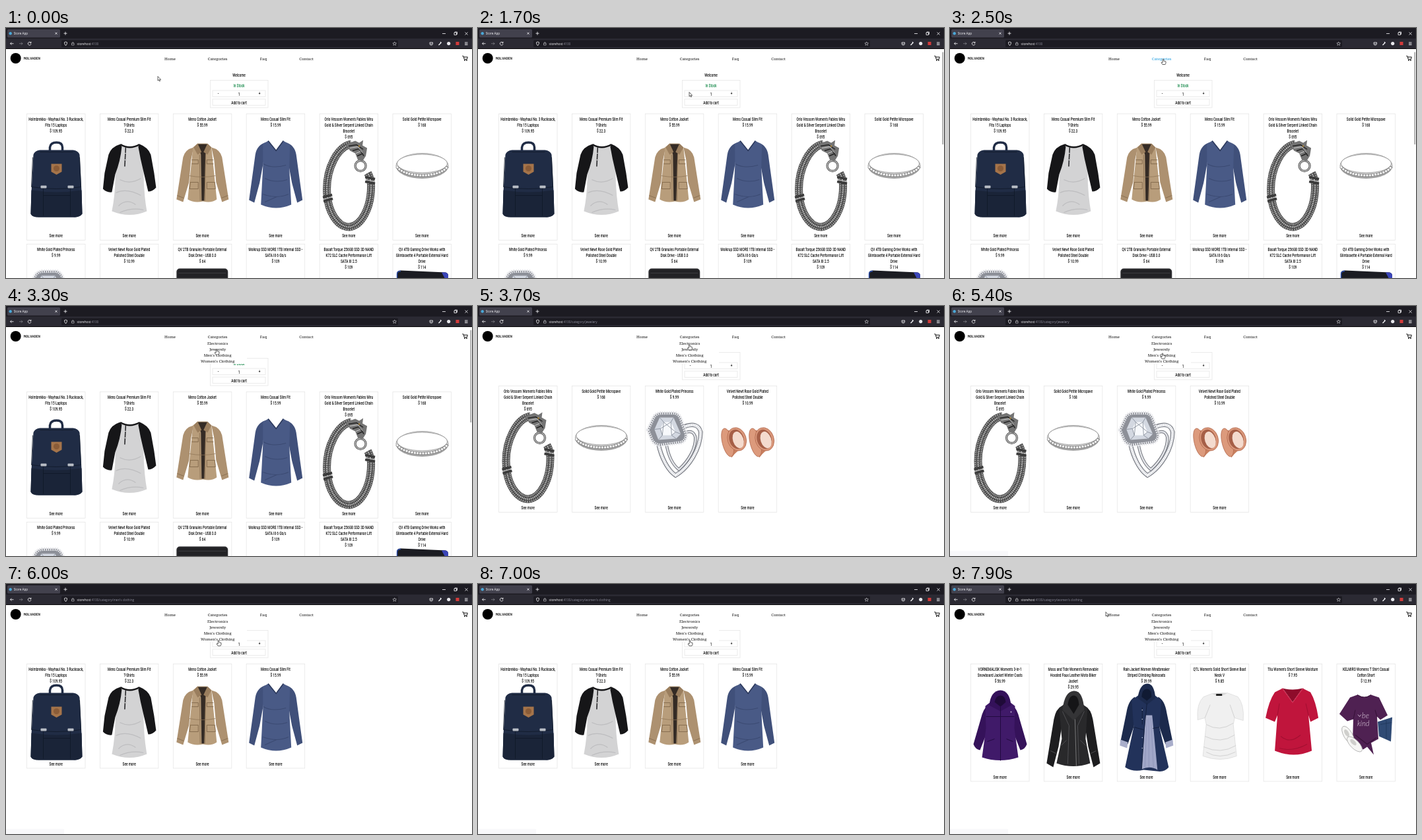
Animation, 706 px wide and 380 px high, one loop 8 s. Source, as an HTML page:

```html
<!DOCTYPE html>
<html>
<head>
<meta charset="utf-8">
<title>Shop</title>
<style>
  html, body { margin: 0; width: 100%; height: 100%; overflow: hidden; background: #fff; }
  svg { display: block; width: 706px; height: 380px; }
  .ui { font: 4.7px "Open Sans", "Noto Sans", sans-serif; fill: #fbfbfe; }
  .slab { font: 500 6px "Noto Serif", serif; text-anchor: middle; fill: #111; }
  .narrow { font: 500 7.2px Roboto, "Liberation Sans", sans-serif; text-anchor: middle; fill: #111; }
  .brand { font: 700 5.2px "DejaVu Sans Mono", monospace; fill: #222; }
  .box { fill: #fff; stroke: #e6e6e6; stroke-width: .8; }
  .icon { fill: none; stroke: #fbfbfe; stroke-width: .8; }
</style>
</head>
<body>
<svg id="stage" viewBox="0 0 706 380"></svg>
<script>
const fill = (d, color, extra = '') => `<path d="${d}" fill="${color}" ${extra}/>`;
const line = (d, color, width = .7, extra = '') =>
  `<path d="${d}" fill="none" stroke="${color}" stroke-width="${width}" ${extra}/>`;
const rect = (x, y, w, h, color, rx = 0) =>
  `<rect x="${x}" y="${y}" width="${w}" height="${h}" rx="${rx}" fill="${color}"/>`;
const dot = (x, y, r, color) => `<circle cx="${x}" cy="${y}" r="${r}" fill="${color}"/>`;
const oval = (x, y, rx, ry, color, turn = 0, extra = '') =>
  `<ellipse rx="${rx}" ry="${ry}" fill="${color}" transform="translate(${x} ${y}) rotate(${turn})" ${extra}/>`;
const box = (x, y, w, h) => `<rect class="box" x="${x}" y="${y}" width="${w}" height="${h}"/>`;
const move = (x, y, s) => `<g transform="translate(${x} ${y})">${s}</g>`;
const both = s => s + `<g transform="translate(89 0) scale(-1 1)">${s}</g>`;
const slab = (x, y, s, id = '') => `<text class="slab" id="${id}" x="${x}" y="${y}">${s}</text>`;
// Condensed face: one fixed narrowing for all shop text
const narrow = (x, y, s, color = '#111') =>
  `<text class="narrow" style="fill:${color}" transform="translate(${x} ${y}) scale(.66 1)">${s}</text>`;

// Product pictures, relative to the top left corner of a card
const art = {
  backpack: () =>
    line('M35 60V51Q36 43.500 45 43.500T54 51V60', '#202c45', 3.5) +
    fill('M10 62Q12 56 20 55H70Q78 56 80 62L83 118L84 152Q80 158 70 157H18Q8 157 6 152L7 118Z', '#202c45') +
    fill('M7 116Q45 122 83 116L84 152Q80 157 70 157H18Q8 157 6 152Z', '#1a2438') +
    line('M9 66L7 111Q45 117 82 111L80 66M25 112V155M66 112V155M25 124H66M20 58H70', '#101828', .8) +
    fill('M37 76H53V88L45 92.500L37 88Z', '#a5744a') + dot(45, 83, 4.5, '#8a5c38') +
    rect(21, 109, 9, 4, '#b9bec6', 1) + rect(62, 109, 9, 4, '#b9bec6', 1),

  raglan: () =>
    fill('M30 47Q45 54 61 47L66 85Q66 120 71 148Q45 159 18 148Q24 118 23 88Z', '#d3d3d4') +
    line('M28 140Q40 128 54 138M24 120Q40 112 62 124M30 150Q48 142 66 146M30 100Q46 108 62 98', '#bdbdbf', 1.2) +
    fill('M31 46Q17 50 13 62L7 90L4.500 114Q10 120 18 119L23 92Q31 72 33 50Z', '#161618') +
    fill('M60 46Q73 51 77 62L82 90L85 112Q80 118 73 118L66 88Q61 68 58 50Z', '#161618') +
    line('M31 46.500Q45 55 60 46.500', '#161618', 2.5) + line('M39 50L37.500 80', '#29292b', 1.6) +
    dot(38.5, 60, .8, '#fff') + dot(38, 70, .8, '#fff'),

  jacket: () =>
    both(fill('M31 51Q18 54 15 66L5 130L15 134L24 104L27 70Z', '#ad9170')) +
    fill('M30 51L37 45H51L58 51L66 130Q58 136 45 133Q32 136 22 130Z', '#b89d7b') +
    fill('M37 46H52L49 62L47 132H43L42 62Z', '#342b25') +
    both(fill('M31 51L37 45L43 58L37 62Z', '#9a7e5e') + line('M26 104H38V114H25ZM28 70H38V76H28', '#7b6246', .8) +
      line('M6 124L16 128M40 62L41 132', '#7b6246', .7)) + line('M24 94Q45 98 64 94', '#8c7253'),

  vneck: () =>
    both(fill('M30 43Q16 47 13.500 62L9 95L4 131L12 135L20 105L25 78Z', '#40507a')) +
    fill('M33 41L45 56L56 41L66 47L65 82L68 138Q45 148 22 138L25 82L25 46Z', '#495a86') +
    line('M33 41L45 56L56 41', '#2c395c', 1.6) +
    line('M26 76Q38 84 60 78M28 98Q44 106 62 100M25 122Q46 130 64 122M28 134L46 126', '#3b4a72', 1.1),

  bracelet: () => {
    const chain = 'M48 46C26 50 11 84 11 114C11 150 28 172 45 172C64 170 78 142 78 110Q78 99 73 90';
    return line(chain, '#4c4c4c', 12) +
      line(chain, '#b4b4b4', 10.5, 'stroke-dasharray="1.300 1.500"') +
      line(chain, '#3a3a3a', 6, 'stroke-dasharray="1.200 1.600"') +
      line(chain, '#cfcfcf', 2, 'stroke-dasharray="1.500 1.300"') +
      line('M5 127L19 123M6 133L20 129M69 96L84 99M69 103L84 106', '#3b3b3b', 3.5) +
      line('M5 130L20 126M69 100L84 103', '#c9c9c9', 1.2) +
      `<circle cx="62" cy="79" r="8" fill="none" stroke="#666" stroke-width="3.400"/>
       <circle cx="62" cy="79" r="8" fill="none" stroke="#ddd" stroke-width="1"/>` +
      fill('M40 46L54 41L60 44L66 40L65 48L72 52L70 64L65 72L58 70L54 60L46 56Z', '#747474') +
      line('M44 49L56 47L66 54M50 56L60 53L67 64M57 64L64 61', '#222', 1.4) +
      line('M46 52L58 50L65 59M55 60L62 57', '#ddd', .9) + dot(60, 49, 1.2, '#b08a3e');
  },

  band: () =>
    oval(44.5, 79, 40, 19.5, '#a2a2a2') + oval(44.5, 78, 39, 17.5, '#dedede') +
    oval(44.5, 75.5, 38, 14, '#fff', 0, 'stroke="#8e8e8e" stroke-width=".8"') +
    line('M6 80C18 98 71 98 83 80', '#777', 4.4) +
    line('M6 80C18 98 71 98 83 80', '#f4f4f4', 3, 'stroke-dasharray="3.200 1"'),

  princess: () => {
    const halo = 'M4 67L13 47Q16 42 24 41L44 41Q51 42 54 50L62 73Q63 82 55 86L24 90Q14 90 10 82Z';
    const bands = [
      ['M20 88C24 108 34 128 46 136C66 124 84 96 84 70Q80 54 59 62', 6.5],
      ['M32 88C35 106 42 120 51 127C66 114 77 94 76 78Q73 66 61 71', 4.5]
    ];
    return bands.map(([d, w]) => line(d, '#6f727a', w) + line(d, '#d9dbe0', w - 2) +
      line(d, '#fff', w - 3.5, 'stroke-dasharray="1.300 1.300"')).join('') +
      fill(halo, '#8d9098') + line(halo, '#5d6068', 1) +
      line(halo, '#e4e5e9', 5, 'stroke-dasharray="2 1.300"') +
      fill('M14 66L22 48H43L54 73L47 80L20 82Z', '#d3d8e1') +
      fill('M23 65L28 55H39L46 70L40 75H26Z', '#f7f9fc') +
      line('M14 66L23 65L26 75L20 82M22 48L28 55L26 75M43 48L39 55L40 75M54 73L46 70L40 75L47 80M23 65L39 55M28 55L46 70', '#7f8793', .8);
  },

  tunnels: () => {
    const ring = fill('M10 65Q20 72 30 64L42 90Q28 98 20 109Z', '#c9805f') +
      oval(14, 86, 8, 22, '#dc9a7c', -14, 'stroke="#b56b50" stroke-width=".8"') +
      oval(28, 81, 14, 18, '#d9977a', -18, 'stroke="#b56b50" stroke-width=".8"') +
      oval(27.5, 81, 11, 15, '#a65f47', -18) + oval(30, 82, 8, 13, '#f4dbce', -18);
    return ring + move(42, 0, ring);
  },

  drive: () => rect(5, 37, 78, 120, '#303033', 5) + rect(6.5, 38.5, 75, 118, '#222225', 4) +
    line('M8 44H80', '#434347', .8),
  gameDrive: () => move(0, 2, fill('M6 42Q7 38 12 38L80 41Q84 42 84 46V150H6Z', '#1b1c22') +
    line('M6.500 150V43Q7 39 12 39', '#2d4fae', 1.4) + fill('M74 41L80 41Q84 42 84 46V60Z', '#3a45b8')),

  ski: () =>
    both(fill('M27 62Q19 67 15 84L4 122Q7 130 14 131L23 108L27 84Z', '#35125a')) +
    fill('M31 57L22 64L23 98L17 142Q44 151 72 142L66 98L67 64L58 57Z', '#401a69') +
    fill('M28 63Q30 41 45 40Q59 41 61 63L45 72Z', '#34115a') + fill('M36 58Q38 48 45 48T53 58L45 65Z', '#1f0a38') +
    line('M45 65V147M23 80H66M25 118L36 114M64 118L54 114', '#220a40', 1) + dot(61, 73, 1, '#c9bdda'),

  leather: () =>
    both(fill('M27 64Q18 68 15 84L4 151L14 157L22 126L27 94Z', '#1d1d1f')) +
    fill('M32 60L23 67L27 114L19 151Q44 160 70 151L63 114L66 67L57 60Z', '#29292b') +
    fill('M28 70Q31 42 45 41T61 70L45 86Z', '#343436') + fill('M36 62Q38 48 45 48T53 62L45 76Z', '#151517') +
    both(line('M28 72L38 94L36 152M26 124L34 116M10 132L18 136', '#59595c', .8)) + line('M47 84L49 155', '#8d8d8d', .8),

  rain: () =>
    both(fill('M27 50Q17 55 14 74L5 118L16 122L25 96L28 70Z', '#1c2a4c') + fill('M5 115L16 119L15 128L4 124Z', '#a9aecb')) +
    fill('M33 47L22 55L25 96L12 157Q24 165 40 161L60 163Q72 165 78 157L64 96L67 55L56 47Z', '#22325a') +
    fill('M43 78L37 160Q50 154 61 161L53 78Z', '#a1a7c8') +
    line('M45 84L42 157M48 82L48 157M51 82L55 158', '#838ab0', .6) +
    fill('M31 52Q34 31 45 30T58 52L45 62Z', '#1c2a4c') + fill('M37 50Q38 38 45 38T52 50L45 56Z', '#101a33') +
    line('M45 60L41 100L37 160M25 96L40 100M54 98L64 96M38 66V92', '#111c38', .9) +
    [70, 84, 112, 128].map(y => dot(38, y, .8, '#c3c8da')).join(''),

  boat: () =>
    fill('M33 45Q45 52 56 44L72 50Q82 62 80 86L67 82L65 92L70 140Q45 150 19 140L24 92L22 82L11 85Q9 60 20 50Z', '#f0f0f0',
      'stroke="#d9d9d9" stroke-width=".7"') +
    line('M24 92Q44 104 65 90M22 110Q46 122 67 108M20 126Q46 138 69 124M24 134Q44 146 68 134M22 82L30 62M67 82L60 62', '#d2d2d2', 1) +
    fill('M33 45Q45 43 56 44Q45 52 33 45Z', '#d8d8d8') + rect(39, 45.5, 9, 3, '#222'),

  scarlet: () =>
    fill('M29 37L44 58L59 37L71 43Q79 56 83 82L71 88L68 78L73 132Q46 144 17 132L21 78L17 88L3 82Q8 56 17 43Z', '#c0153c') +
    fill('M29 37Q44 41 59 37L44 58Z', '#8e0c2b') + line('M28 37L44 59L60 37', '#d83257', 1) +
    line('M21 78L24 60M68 78L64 60M26 110Q40 122 56 108M24 128Q44 134 66 122', '#a30f31', 1.1),

  kind: () =>
    fill('M62 88L84 81L82 118L64 110Z', '#2f4a74') + line('M66 92L83 89M75 86V114', '#1f3558') +
    move(-2, 0, fill('M33 47Q44 54 54 47L66 51L79 78L68 85L63 80L65 114L54 120L58 138L48 126L42 130L26 118L27 84L18 87L6 76L22 51Z', '#4f2152') +
      line('M33 47Q44 54 54 47M30 108L48 122L62 112M27 84L30 70M63 80L60 70', '#381239', 1.1)) +
    `<g style="font:300 italic 11px Lato,sans-serif;fill:#e8dbe8"><text x="38" y="82">be</text><text x="31" y="94">kind</text></g>` +
    line('M32 77l2.500 3l2.500-3', '#e8dbe8', .8) +
    [[17, 108, 60], [27, 122, 45]].map(([x, y, turn]) =>
      oval(x, y, 15, 6.5, '#f6f6f4', turn, 'stroke="#aaa" stroke-width=".8"') +
      oval(x - 2, y - 3, 6, 3, '#cfcfcc', turn)).join('')
};

const item = (text, price, picture) => ({ lines: [...text.split('|'), '$ ' + price], picture });
const men = [
  item('Holmbrekka - Wayhaul No. 3 Rucksack,|Fits 15 Laptops', 109.95, 'backpack'),
  item('Mens Casual Premium Slim Fit|T-Shirts', 22.3, 'raglan'),
  item('Mens Cotton Jacket', 55.99, 'jacket'),
  item('Mens Casual Slim Fit', 15.99, 'vneck')
];
const jewels = [
  item("Orlo Vessom Women's Fables Miru|Gold &amp; Silver Serpent Linked Chain|Bracelet", 695, 'bracelet'),
  item('Solid Gold Petite Micropave', 168, 'band'),
  item('White Gold Plated Princess', 9.99, 'princess'),
  item('Velvet Newt Rose Gold Plated|Polished Steel Double', 10.99, 'tunnels')
];
const disks = [
  item('QV 2TB Granules Portable External|Disk Drive - USB 3.0', 64, 'drive'),
  item('Molkrup SSD MORE 1TB Internal SSD -|SATA III 6 Gb/s', 109),
  item('Basalt Torque 256GB SSD 3D NAND|K72 SLC Cache Performance Lift|SATA III 2.5', 109),
  item('QV 4TB Gaming Drive Works with|Glimboxette 4 Portable External Hard|Drive', 114, 'gameDrive')
];
const women = [
  item("VORNEMALISK Women's 3-in-1|Snowboard Jacket Winter Coats", 56.99, 'ski'),
  item("Moss and Tide Women's Removable|Hooded Faux Leather Moto Biker|Jacket", 29.95, 'leather'),
  item('Rain Jacket Women Windbreaker|Striped Climbing Raincoats', 39.99, 'rain'),
  item("QTL Women's Solid Short Sleeve Boat|Neck V", 9.85, 'boat'),
  item("Tilu Women's Short Sleeve Moisture", 7.95, 'scarlet'),
  item('KELMIRO Womens T Shirt Casual|Cotton Short', 12.99, 'kind')
];

const cards = (items, top, height, lift = 0) => items.map(({ lines, picture }, i) =>
  move(31.5 + 110.9 * i, top,
    box(0, 0, 88.5, height) +
    (picture ? move(0, -lift, art[picture]()) : '') +
    lines.map((s, n) => narrow(44.2, 10.7 + 8.9 * n, s)).join('') +
    narrow(44.2, height - 4.5, 'See more'))).join('');

const cartBox = y => move(309.5, y,
  box(0, 0, 87.5, 41.5) + narrow(43.5, 10.3, 'In Stock', '#16894a') +
  box(3.5, 15.5, 80, 9.5) + narrow(12, 22.6, '-') + narrow(43.5, 23, '1') + narrow(74.5, 22.8, '+') +
  box(3.5, 28.5, 80, 9.5) + narrow(43.5, 36, 'Add to cart'));

const page = (id, s) => `<g id="${id}">${s}</g>`;
const shopPages =
  page('home', narrow(353, 74, 'Welcome') + cartBox(79.5) +
    cards([...men, ...jewels.slice(0, 2)], 130.5, 192) +
    cards([...jewels.slice(2), ...disks], 328.5, 192)) +
  page('jewelery', cartBox(70.5) + cards(jewels, 121.5, 192)) +
  page('men', cartBox(70.5) + cards(men, 121.5, 158.5, 11)) +
  page('women', cartBox(70.5) + cards(women, 121.5, 178.5));

const browser =
  rect(0, 0, 706, 16, '#1c1b22') + rect(0, 16, 706, 15, '#2b2a33') + rect(0, 31, 706, 1, '#0c0c0d') +
  rect(2, 2, 80, 12.5, '#42414d', 1.5) + dot(6.7, 8.2, 2.2, '#4aa8d8') +
  '<text class="ui" x="11.800" y="10">Store App</text>' +
  rect(84, 18.5, 510, 10.5, '#1c1b22', 1.5) +
  `<path class="icon" d="M74.500 6.700l3 3m0-3l-3 3M87.500 8.200h5m-2.500-2.500v5M661 8.500h5M679 7h3.500v3.500h-3.500zM680 7v-1h3.500v3.500h-1M695.500 6.500l4 4m0-4l-4 4
    M11.500 23.700h-5m2-2l-2 2l2 2M37.700 22.400a2.400 2.400 0 1 0 .3 2M38 20.800v2h-2M90.500 21l2 .8q0 3.500-2 5q-2-1.500-2-5zM642 22h4.500v1.800a2.250 2.250 0 0 1-4.500 0zM643 23.300l1.250 1.200l1.250-1.200
    M695 22h4.500m-4.500 1.800h4.500m-4.500 1.800h4.500"/>` +
  '<path class="icon" stroke-opacity=".4" d="M20 23.700h5m-2-2l2 2l-2 2"/>' +
  '<path class="icon" style="stroke-width:.5" d="M99.500 23.200h3.600v2.800h-3.600zM100.200 23v-.7q1.100-1.600 2.200 0v.7M588.700 21l.8 1.800l2 .2l-1.500 1.300l.5 2l-1.800-1.100l-1.800 1.100l.5-2l-1.500-1.300l2-.2z"/>' +
  line('M655.500 26l3.200-3.200M658 21.200l1.600 1.600', '#fbfbfe', 1.3) +
  dot(670.7, 23.6, 2.6, '#e8e8ec') + rect(681.5, 21, 5, 5, '#d33b3b') +
  '<text class="ui" x="107.500" y="25.600">storehost<tspan id="path" fill="#8f8f9d"></tspan></text>';

const header =
  dot(14.7, 46, 8, '#000') + '<text class="brand" x="26.800" y="48">MOLVADEN</text>' +
  slab(248.5, 48.5, 'Home') + slab(390, 48.5, 'Faq') + slab(455, 48.5, 'Contact') +
  move(-.7, 0, line('M692 42.700h1.700l1.300 5h4l1-3.600h-5.800', '#111', 1) +
    dot(695.6, 49.2, .9, '#111') + dot(698.6, 49.2, .9, '#111')) +
  page('menu', rect(276, 51, 89, 37, '#fff') +
    ['Electronics', 'Jewerely', "Men's Clothing", "Women's Clothing"]
      .map((s, i) => slab(320.7, 59 + 8.85 * i, s)).join('')) +
  slab(320.7, 48.5, 'Categories', 'categories');

const outline = 'stroke="#222" stroke-width=".7" stroke-linejoin="round"';
const $ = id => document.getElementById(id);
$('stage').innerHTML = shopPages + header + browser +
  page('scrollbar', rect(703.6, 36.5, 1.3, 140.5, '#8a8a8a', .6)) +
  page('status', rect(0, 372.5, 88, 8, '#f8f8fa', 1)) +
  page('cursor',
    page('arrow', fill('M0 0V6.500L1.500 5.200L2.600 7.500L3.600 7L2.600 4.900H4.600Z', '#fff', outline)) +
    page('hand', fill('M-.8 .6Q0-.5 .8 .6V3.200L4 4V6.500L3 8.500H-1L-3 5.500Q-2.500 4.500-.8 5.500Z', '#fff', outline)));

// time, x, y of the pointer tip
const trail = [
  [0, 230, 73.5], [300, 230, 73.5], [700, 281, 64], [800, 281, 64], [900, 308, 168], [1200, 308, 168],
  [1700, 320, 97.5], [2100, 322, 48], [2300, 319, 50], [2500, 323, 47], [2600, 323, 47],
  [3300, 319, 65.5], [3500, 319, 65], [4100, 323, 45], [4600, 323, 45], [5200, 322, 71], [5500, 322, 72],
  [6000, 322, 85.5], [6300, 322, 85.5], [7000, 321, 85.5], [7400, 175, 59], [7500, 175, 59], [7900, 236, 42.5]
];

function pointer(t) {
  const i = trail.findIndex(k => k[0] > t);
  if (i < 0) return trail[trail.length - 1].slice(1);
  const [t0, x0, y0] = trail[i - 1], [t1, x1, y1] = trail[i], u = (t - t0) / (t1 - t0);
  return [x0 + (x1 - x0) * u, y0 + (y1 - y0) * u];
}

const show = (id, on) => $(id).style.display = on ? '' : 'none';

function draw(now) {
  const t = Math.floor(now % 8000 / 100) * 100;
  const current = t < 3400 ? 'home' : t < 5700 ? 'jewelery' : t < 7100 ? 'men' : 'women';
  for (const id of ['home', 'jewelery', 'men', 'women']) show(id, id === current);
  $('path').textContent = ':4100' + (t < 3400 ? '' : '/category/' +
    (t < 5500 ? 'jewelery' : t < 6800 ? "men's clothing" : "women's clothing"));

  const hand = t >= 2100 && t < 7100;
  const [x, y] = pointer(t);
  show('menu', t >= 2700);
  show('scrollbar', t >= 1300 && t < 3400);
  show('status', t >= 4800);
  show('hand', hand);
  show('arrow', !hand);
  $('cursor').setAttribute('transform', `translate(${x} ${y})`);
  $('categories').style.fill = hand && y < 52 ? '#1a9be0' : '#111';
  requestAnimationFrame(draw);
}
requestAnimationFrame(draw);
</script>
</body>
</html>
```
